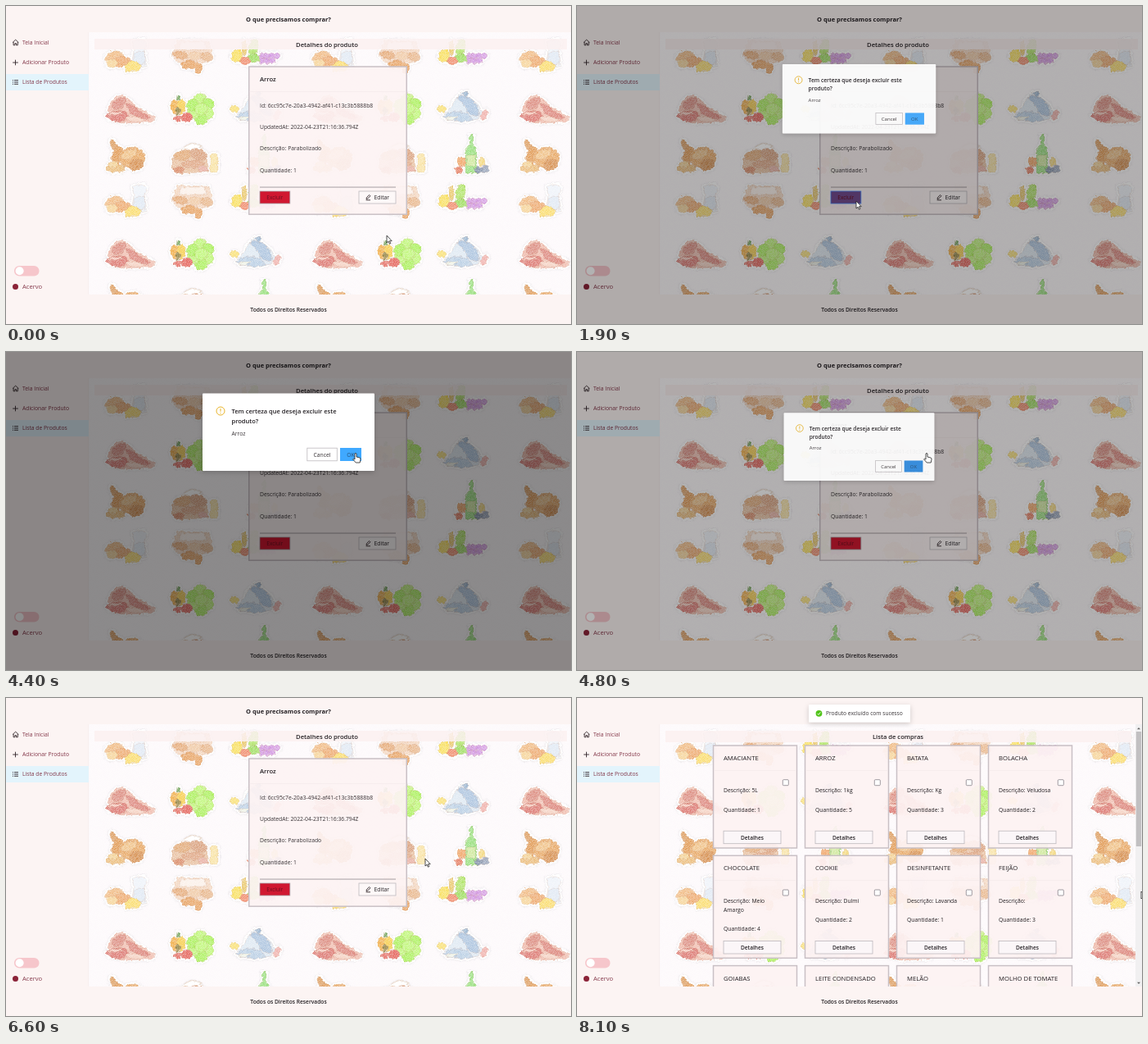
An HTML page that plays this animation: 690x388 px, repeating every 8.4 s.

```html
<!DOCTYPE html>
<html lang="pt-BR">
<head>
<meta charset="utf-8">
<title>Lista de compras</title>
<style>
  html, body { margin: 0; width: 100%; height: 100%; overflow: hidden; background: #fcf4f3; }
  svg { display: block; width: 100vw; height: 100vh; }
  text { font-family: "Open Sans", "Noto Sans", sans-serif; font-size: 6.8px; fill: #383336; }
  .strong { font-weight: 600; fill: #242024; }
  .menu { fill: #84384a; }
  .mid { text-anchor: middle; }
  .icon { fill: none; stroke: #33262b; stroke-width: .9; }
  .halo { stroke: #fff; stroke-width: 4; stroke-linejoin: round; }
  .halo * { fill: #fff; }
  .line { stroke: #a8603c; stroke-opacity: .3; stroke-width: .6; opacity: .88; }
</style>
</head>
<body>
<svg id="stage" viewBox="0 0 690 388"></svg>
<script>
const LOOP = 8400, STEP = 100;
const LIST_AT = 6900, CLICK = { x: 341, y: 241 };

const text = (x, y, str, size = 6.8, cls = '', extra = '') =>
  `<text x="${x}" y="${y + size * .36}" class="${cls}" style="font-size:${size}px;${extra}">${str}</text>`;
const rect = (x, y, w, h, fill, extra = '') =>
  `<rect x="${x}" y="${y}" width="${w}" height="${h}" fill="${fill}" ${extra}/>`;
const oval = (x, y, rx, ry, fill, turn = 0) =>
  `<ellipse cx="${x}" cy="${y}" rx="${rx}" ry="${ry}" fill="${fill}" transform="rotate(${turn} ${x} ${y})"/>`;
const path = (d, fill, extra = '') => `<path d="${d}" fill="${fill}" ${extra}/>`;
const frame = 'stroke="#c9c0c5" stroke-width="1.5"';
const thin = 'stroke="#bdb9bd" stroke-width=".8"';

// Food drawings, laid out in one 253 x 177 wallpaper tile
const foods = [
  // jug and cheese
  path('M53 12l5 -3h10l3 4-3 8 3 20q-10 5-19 0l3-19z', '#edf2f9') + path('M55 25l13-2 1 16-14 2z', '#dfe8f3') +
  oval(31, 30, 11, 7, '#f0b67a', -15) + oval(39, 36, 13, 6, '#eca263', -8) + oval(28, 38, 7, 5, '#f5d08f') +
  path('M44 41l9-7 11 6-2 7-17 1z', '#fada62'),
  // bread bag
  path('M108 10l39 1 4 17-6 9h-36l-8-9z', '#f3d3ba') + path('M112 12h30l2 9h-33z', '#fbefe6') +
  oval(112, 28, 10, 5, '#e3a26c', 10) + oval(130, 29, 9, 5, '#efc49d') + oval(144, 30, 8, 5, '#e6b182', 20) +
  path('M113 38q14-9 26 3l-3 9q-6 2-7-5l-15-1z', '#e59a55'),
  // fruit
  oval(201, 19, 6, 10, '#a9e25b', 15) + oval(190, 19, 3, 10, '#e8c35d') +
  oval(181, 29, 7, 8, '#f8dc4f') + oval(201, 32, 8, 6, '#95da50') + oval(191, 35, 7, 5, '#ef7f5c') +
  [0, 1, 2, 3, 4, 5, 6].map(i => oval(212 + i % 4 * 6, 29 + (i >> 2) * 6, 3.8, 3.8, '#cf8fdf')).join(''),
  // meat
  path('M23 96q4-17 16-19 11 3 18 13l23 13q2 5-5 7l-36 1z', '#eeb5a4') +
  oval(37, 87, 10, 6, '#d98275', -38) + path('M46 87q9 0 15 8l15 9-4 3-21-7z', '#d9796e') +
  path('M20 102q9-8 23-6l7 7-9 6q-15 1-21-7z', '#d96c64') + oval(56, 106, 11, 3, '#f4cdbd', 8) + oval(33, 99, 9, 2, '#f3c0b2', -8),
  // vegetables
  [[136, 82], [145, 88], [145, 99], [137, 106], [128, 98], [127, 89], [137, 94]]
    .map((p, i) => oval(...p, 8, 7.5, i % 2 ? '#a2ee4b' : '#b9f56b')).join('') +
  oval(105, 91, 5, 9, '#f0a635') + oval(113, 91, 5, 9, '#f6c93c') +
  path('M107 82l1-6 3 1 1 6z', '#5f9c48') + oval(109, 96, 3, 5, '#8b7b35') +
  oval(120, 104, 7, 6, '#e2564d') + oval(109, 105, 5, 4, '#e3655b'),
  // fish
  path('M181 99q8-4 12-15l9-11 8 7q15 5 17 19l-4 6q-20 4-37 3z', '#dbe6f1') +
  path('M196 80q13-7 22 5 7 9 5 18-11-1-15-9-4-9-12-14z', '#a3bedb') +
  path('M179 103q14-10 30-4l9 8q-17 6-39-4z', '#b4cbe2') + path('M203 73l7-1-1 10z', '#8eabc9') +
  oval(230, 101, 4, 7, '#efaaa4', 30) + oval(178, 94, 5, 4, '#f9df6c') + oval(190, 105, 7, 2, '#edf2e5', -10),
  // roast turkey
  oval(31, 138, 4, 8, '#da9552', -30) + oval(35, 151, 7, 12, '#df9145', 15) +
  oval(53, 153, 16, 13, '#e5a057') + oval(49, 149, 10, 5, '#efbd7d', -25) +
  oval(33, 166, 12, 5, '#e9b46c') + oval(58, 162, 9, 7, '#d2853f', -20) + oval(30, 161, 6, 4, '#f2cd8b'),
  // bread basket
  path('M107 153q20-34 40-1', 'none', 'style="stroke:#e6d3c3;stroke-width:1.2"') +
  path('M102 153l42-3 3 20-37 3-8-6z', '#e7bb98') + oval(115, 150, 12, 6, '#dfa068', -12) +
  oval(134, 149, 11, 7, '#d59770', 20) + oval(127, 161, 14, 5, '#dc9e78') +
  rect(148, 148, 10, 23, '#f8e09a', 'rx="3"') + oval(110, 168, 7, 4, '#d67f58') + oval(140, 167, 6, 4, '#e6a99b'),
  // oil bottle
  path('M212 125h5v13q4 4 4 8v26h-14v-26q0-4 5-8z', '#8fdc71') + rect(209, 150, 10, 13, '#cbe694') +
  oval(202, 158, 6, 6, '#ee9a55') + oval(199, 168, 5, 4, '#e47558') + oval(227, 158, 4, 5, '#f3d573') +
  oval(224, 168, 6, 4, '#73839f') + oval(232, 166, 4, 5, '#8b99b2')
];

const defs = `<defs>
  <pattern id="hatch" width="2" height="2" patternUnits="userSpaceOnUse" patternTransform="rotate(52)">
    ${rect(0, 0, .7, 2, '#fff', 'opacity=".55"')}</pattern>
  <pattern id="foods" width="253" height="177" patternUnits="userSpaceOnUse" patternTransform="translate(101 32)">
    <g filter="url(#crayon)">
      ${foods.map(f => `<g filter="url(#soft)"><g class="halo">${f}</g></g><g class="line">${f}</g>`).join('')}
      ${rect(0, 0, 253, 177, 'url(#hatch)')}</g></pattern>
  <filter id="soft"><feDropShadow dx="0" dy="0" stdDeviation="1.2" flood-color="#98949c" flood-opacity=".38"/></filter>
  <filter id="crayon" x="0" y="0" width="100%" height="100%" color-interpolation-filters="sRGB">
    <feTurbulence type="fractalNoise" baseFrequency=".25" numOctaves="2" seed="4" result="grain"/>
    <feDisplacementMap in="SourceGraphic" in2="grain" scale="4.5" xChannelSelector="R" yChannelSelector="G"/>
    <feGaussianBlur stdDeviation=".35"/></filter>
  <filter id="lift" x="-20%" y="-20%" width="140%" height="150%">
    <feDropShadow dx="0" dy="2" stdDeviation="3" flood-opacity=".18"/></filter>
  <clipPath id="content">${rect(101, 32, 589, 320, '#000')}</clipPath></defs>`;

const shell = rect(0, 0, 690, 388, '#fcf4f3') + rect(101, 32, 589, 320, '#fdf9fb') +
  rect(101, 32, 589, 320, 'url(#foods)') +
  rect(100.5, 32, .6, 320, '#f3e9ea') + rect(0, 83, 101, 20, '#e3f4fc') +
  text(345, 16.3, 'O que precisamos comprar?', 7.5, 'strong mid', 'font-weight:700') +
  text(345, 370.3, 'Todos os Direitos Reservados', 6.67, 'strong mid') +
  text(20, 44.5, 'Tela Inicial', 6.75, 'menu') +
  text(20, 69, 'Adicionar Produto', 6.75, 'menu') +
  text(20, 93, 'Lista de Produtos', 6.75, 'menu') +
  text(20, 342.3, 'Acervo', 7.6, 'menu', 'font-weight:500') +
  `<path class="icon" d="M8 44.6l3.7-3.4 3.7 3.4M9.1 44v3.8h1.8v-2.2h1.6v2.2h1.8V44
    M8.2 69h6.6M11.5 65.7v6.6M10 90.7h5M10 93h5M10 95.3h5M8 90.7h1M8 93h1M8 95.3h1"/>` +
  '<circle cx="11.5" cy="342.5" r="3.5" fill="#8b2338"/>' +
  rect(10, 317, 30.5, 12.5, '#f6c6cb', 'rx="6.25"') + '<circle cx="16.6" cy="323.2" r="5" fill="#fff"/>';

const detail = `<g id="detail">
  ${rect(108, 40, 577, 13, '#fcf1f1', 'opacity=".85"')}
  ${text(392, 47, 'Detalhes do produto', 7.65, 'strong mid')}
  ${rect(296.75, 74, 192.5, 180.2, '#fdf3f4', `fill-opacity=".92" ${frame}`)}
  ${rect(297.5, 104, 191, .6, '#f4eaeb')}
  ${text(310, 89.6, 'Arroz', 7.6, 'strong')}
  ${text(310, 121.3, 'Id: 6cc95c7e-20a3-4942-af41-c13c3b5888b8')}
  ${text(310, 147.5, 'UpdatedAt: 2022-04-23T21:16:36.794Z', 6.75)}
  ${text(310, 174, 'Descrição: Parabolizado', 6.75)}
  ${text(310, 200.3, 'Quantidade: 1')}
  ${rect(310, 220.6, 166, .9, '#9c9599')}
  ${rect(310, 226, 36.8, 15, '#d01831', 'id="remove" stroke="#a9a0a6" stroke-width=".8"')}
  ${text(328.3, 233.8, 'Excluir', 6.5, 'mid', 'fill:#6b1020')}
  ${rect(431, 226, 45, 15, '#fdf8f8', thin)}
  <path class="icon" d="M439.6 236.8h5.4M440 235.4l.4-1.7 3.2-3.2 1.3 1.3-3.2 3.2z"/>
  ${text(449.5, 233.8, 'Editar', 6.8, 'strong', 'font-weight:500')}</g>`;

const products = [
  ['AMACIANTE', '5L', 1], ['ARROZ', '1kg', 5], ['BATATA', 'Kg', 3], ['BOLACHA', 'Veludosa', 2],
  ['CHOCOLATE', 'Meio|Amargo', 4], ['COOKIE', 'Dulmi', 2], ['DESINFETANTE', 'Lavanda', 1], ['FEIJÃO', '', 3],
  ['GOIABAS', '', 1], ['LEITE CONDENSADO', '', 1], ['MELÃO', '', 1], ['MOLHO DE TOMATE', '', 1]
];
const card = ([name, about, count], i) => {
  const x = 166.5 + i % 4 * 112, y = 58 + (i >> 2) * 134.3, left = x + 12.5;
  const [first, second] = about.split('|');
  const label = (dy, str) => text(left, y + dy, str, 6.8, 'strong', 'font-weight:500');
  return rect(x, y, 102, 125, '#fdf3f3', `fill-opacity=".93" ${frame}`) +
    rect(x + 1, y + 30, 100, .6, '#f3e9ea') +
    text(left, y + 15.3, name, 7.7, 'strong', 'font-weight:500') +
    rect(x + 84.8, y + 41.7, 7, 7, '#fff', 'rx="1" stroke="#77727a" stroke-width=".7"') +
    label(55, 'Descrição: ' + first) + (second ? label(66, second) : '') +
    label(second ? 89.5 : 78.3, 'Quantidade: ' + count) +
    rect(left, y + 104.2, 70, 15.5, '#fbf6f8', thin) +
    text(left + 35, y + 112.2, 'Detalhes', 6.55, 'strong mid');
};
const list = `<g id="list" clip-path="url(#content)">
  ${rect(108, 40, 569, 14, '#fcf1f1', 'opacity=".85"')}
  ${text(392, 47.3, 'Lista de compras', 7.6, 'strong mid')}
  ${products.map(card).join('')}
  ${rect(682, 32, 8, 320, '#f1f0f1') + rect(682.8, 41, 6.4, 140, '#c2c0c2')}
  ${path('M684 38.3l2-2.4 2 2.4zM684 346.7l2 2.4 2-2.4z', '#666')}</g>`;

const toast = `<g id="toast">${rect(283, 8, 124, 21.5, '#fff', 'rx="1" filter="url(#lift)"')}
  <circle cx="295.5" cy="18.8" r="3.9" fill="#52c41a"/>
  <path d="M293.6 18.9l1.4 1.5 2.4-3" fill="none" stroke="#fff" stroke-width=".9"/>
  ${text(304, 19, 'Produto excluído com sucesso', 6.65)}</g>`;

const modal = `${rect(0, 0, 690, 388, '#000', 'id="mask"')}<g id="modal">
  ${rect(240, 50.5, 210, 94.5, '#fff', 'rx="1" filter="url(#lift)"')}
  <circle cx="262" cy="72" r="5" fill="none" stroke="#e9b429"/>
  <path d="M262 69v3.8M262 74v1.2" stroke="#e9b429"/>
  ${text(275.5, 72.5, 'Tem certeza que deseja excluir este', 7.53, 'strong')}
  ${text(275.5, 83.8, 'produto?', 7.53, 'strong')}
  ${text(275.5, 99.2, 'Arroz')}
  ${rect(367.8, 117.2, 36.5, 15.6, '#fff', thin) + text(386, 125.2, 'Cancel', 6.8, 'mid')}
  ${rect(408, 117, 26, 16, '#40a9ff', 'id="ok"') + text(421, 125.2, 'OK', 6.8, 'mid', 'fill:#245078')}</g>`;

const outline = 'stroke="#222" stroke-width=".8" stroke-linejoin="round"';
const cursor = `<g id="cursor">
  <g id="arrow">${path('M0 0v9l2-1.8 1.4 3 1.4-.6-1.4-2.9h2.8z', '#fff', outline)}</g>
  <g id="hand">${path('M-2-4q1-1.2 2 0v4l4 1q1.2.4 1 2l-.8 4h-5l-3.6-4.2q.4-1.4 2.4.2z', '#fff', outline)}</g>
  <path id="beam" d="M-1.6-4.5h3.2M0-4.5v9M-1.6 4.5h3.2" fill="none" stroke="#333" stroke-width=".8"/></g>`;

document.getElementById('stage').innerHTML = defs + shell + detail + list + toast + modal + cursor;
const el = id => document.getElementById(id);
const show = (id, on) => el(id).style.display = on ? '' : 'none';

const clamp = v => Math.min(1, Math.max(0, v));
const ramp = (t, start, span = 300) => clamp((t - start) / span);
const smooth = v => v * v * (3 - 2 * v);
const mix = (a, b, k) => a + (b - a) * k;

// CSS-style cubic-bezier easing, solved by bisection
const bezier = (x1, y1, x2, y2) => x => {
  const at = (u, a, b) => 3 * (1 - u) ** 2 * u * a + 3 * (1 - u) * u * u * b + u ** 3;
  let low = 0, high = 1;
  for (let i = 0; i < 24; i++) {
    const u = (low + high) / 2;
    at(u, x1, x2) < x ? low = u : high = u;
  }
  return at(low, y1, y2);
};
const easeOut = bezier(.08, .82, .17, 1), easeInOut = bezier(.78, .14, .15, .86);

// time, x, y
const route = [[0, 465, 280], [100, 465, 280], [900, 341, 238], [2100, 341, 238], [2800, 408, 148],
  [3800, 428, 128], [5400, 428, 128], [6500, 512, 196], [7100, 512, 196], [8100, 689, 236]];
const pointer = t => {
  const i = route.findIndex(p => p[0] > t);
  if (i < 0) return route.at(-1).slice(1);
  const [a, b] = [route[i - 1], route[i]], k = smooth((t - a[0]) / (b[0] - a[0]));
  return [mix(a[1], b[1], k), mix(a[2], b[2], k)];
};

function draw(t) {
  show('detail', t < LIST_AT);
  show('list', t >= LIST_AT);

  const hover = smooth(ramp(t, 700)) * (1 - ramp(t, 1750));
  el('remove').setAttribute('fill', `rgb(${mix(208, 24, hover)},${mix(24, 130, hover)},${mix(49, 240, hover)})`);
  el('remove').setAttribute('stroke', hover > .1 ? '#4a8cff' : '#a9a0a6');

  const closing = t >= 4700;
  const open = closing ? 1 - easeInOut(ramp(t, 4700)) : easeOut(ramp(t, 1815));
  el('mask').setAttribute('opacity', .45 * (closing ? 1 - ramp(t, 4700) : ramp(t, 1700)));
  show('modal', open > .001);
  el('modal').setAttribute('opacity', Math.sqrt(open));
  el('modal').setAttribute('transform',
    `translate(${CLICK.x} ${CLICK.y}) scale(${.2 + .8 * open}) translate(${-CLICK.x} ${-CLICK.y})`);
  el('ok').setAttribute('fill', t >= 4600 ? '#2f8be0' : '#40a9ff');

  const drop = easeOut(ramp(t, LIST_AT));
  show('toast', t >= LIST_AT);
  el('toast').setAttribute('opacity', drop);
  el('toast').setAttribute('transform', `translate(0 ${-22 * (1 - drop)})`);

  const [x, y] = pointer(t);
  const hand = t >= 800 && t < 1800 || t >= 3400 && t < 4900;
  const beam = t >= 4900 && t < 5600;
  el('cursor').setAttribute('transform', `translate(${x} ${y})`);
  show('hand', hand);
  show('beam', beam);
  show('arrow', !hand && !beam);
}

const start = performance.now();
let drawn = -1;
function tick() {
  const t = Math.floor((performance.now() - start) % LOOP / STEP) * STEP;
  if (t !== drawn) draw(drawn = t);
  requestAnimationFrame(tick);
}
tick();
</script>
</body>
</html>
```
